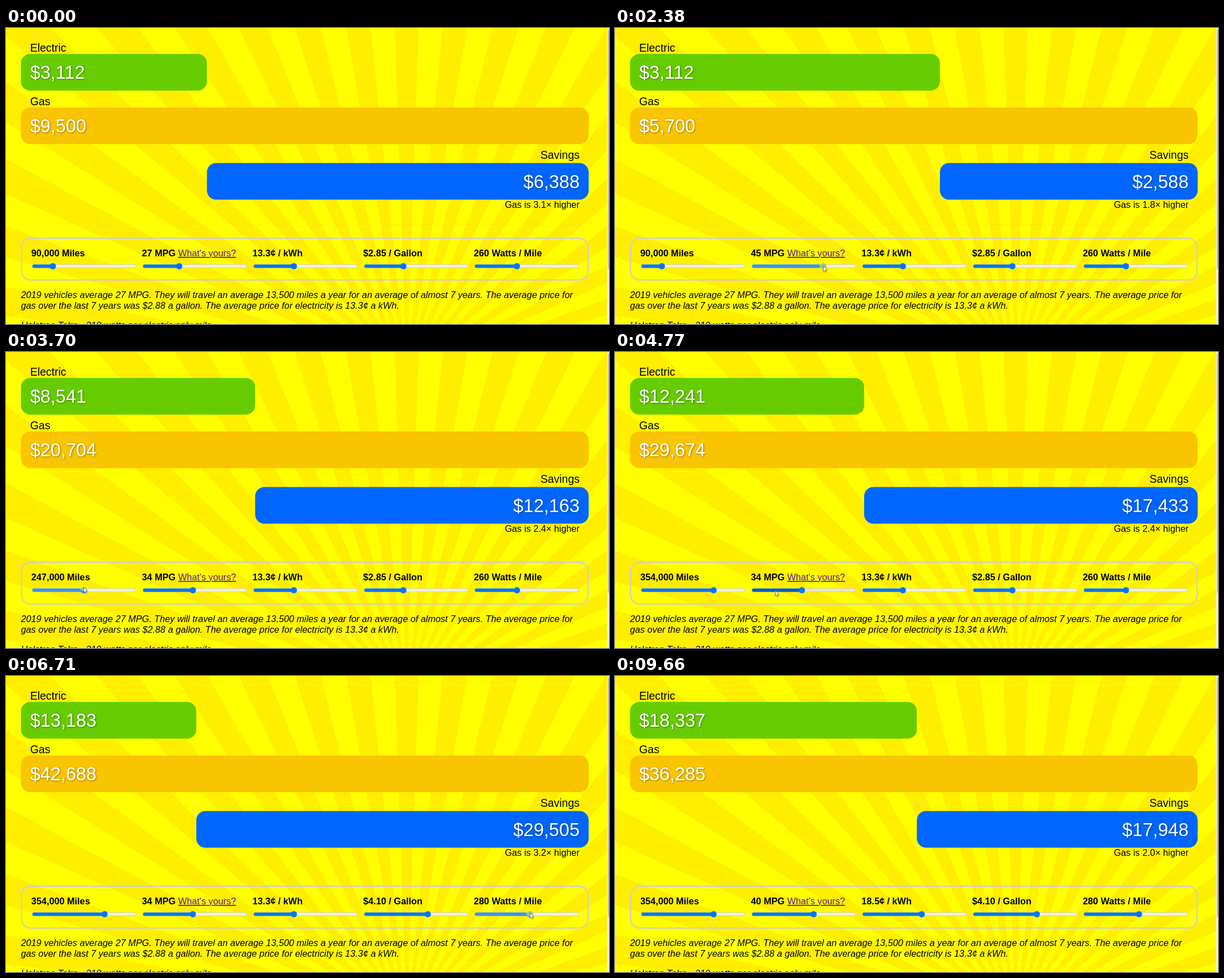
Recreate the animation shown at these times as an HTML page. Size 1067x525 px, loop 9980 ms.

```html
<!DOCTYPE html>
<html lang="en">
<head>
<meta charset="utf-8">
<title>Electric vs gas</title>
<style>
  html, body { margin: 0; width: 100%; height: 100%; overflow: hidden; }
  body { background: repeating-conic-gradient(from -2deg at 709px 610px, #fe0 0 4deg, #ff0 4deg 8deg); }
  svg { display: block; width: 1067px; height: 525px; }
  text { font: 16.25px "Liberation Sans", Arial, sans-serif; white-space: pre; }
  .name { font-size: 19.5px; }
  .cost { font-size: 32.5px; fill: #fff; filter: drop-shadow(1px 1px 1.5px rgba(0, 0, 0, .4)); }
  .end { text-anchor: end; }
  .label { font-weight: bold; }
  .link { font-weight: normal; fill: #551a8b; text-decoration: underline; }
  .note { font-style: italic; }
</style>
</head>
<body>
<svg viewBox="0 0 1067 525">
  <text class="name" x="42.7" y="42">Electric</text>
  <rect id="electricBar" x="26.5" y="46" height="65" rx="16.2" fill="#6c0"/>
  <text id="electric" class="cost" x="42.7" y="90"></text>

  <text class="name" x="42.7" y="136.7">Gas</text>
  <rect id="gasBar" x="26.5" y="141" height="65" rx="16.2" fill="#f9c400"/>
  <text id="gas" class="cost" x="42.7" y="185"></text>

  <text class="name end" x="1015" y="232">Savings</text>
  <rect id="savingsBar" y="239.5" height="65" rx="16.2" fill="#06f"/>
  <text id="savings" class="cost end" x="1015" y="283.5"></text>
  <text id="ratio" class="end" x="1015" y="319.3"></text>

  <rect x="27.5" y="373" width="1002.5" height="74" rx="16" fill="none" stroke="#ccc" stroke-width="2"/>
  <g id="sliders"></g>

  <g class="notes">
    <text class="note" x="26.5" y="479">2019 vehicles average 27 MPG. They will travel an average 13,500 miles a year for an average of almost 7 years. The average price for</text>
    <text class="note" x="26.5" y="497.7">gas over the last 7 years was $2.88 a gallon. The average price for electricity is 13.3¢ a kWh.</text>
    <text class="note" x="26.5" y="533">Halstran Telro - 310 watts per electric only mile</text>
  </g>

  <rect x="1064" width="3" height="525" fill="#f1f1f1"/>
  <rect x="1065" y="3" width="2" height="424" fill="#c1c1c1"/>

  <circle id="press" r="7" fill="#ff0" opacity=".5"/>
  <path id="cursor" d="M0 0V9.5L2.2 7.6L3.8 11L5.5 10.2L4 7H7Z" fill="#fff" stroke="#444" stroke-width=".8"/>
</svg>
<script>
const LOOP = 9980, LEFT = 26.5, WIDTH = 1004.5, TRACK = 183.5, TRAVEL = 173.2;
const $ = id => document.getElementById(id);
const money = n => '$' + n.toLocaleString('en-US');

const specs = {
  miles:  { min: 0, max: 500000, step: 500, start: 90000, text: v => v.toLocaleString('en-US') + ' Miles' },
  mpg:    { min: 10, max: 60, step: 1, start: 27, text: v => v + ' MPG ' },
  kwh:    { min: 3, max: 30, step: .1, start: 13.3, text: v => v.toFixed(1) + '¢ / kWh' },
  gallon: { min: 1, max: 6, step: .05, start: 2.85, text: v => '$' + v.toFixed(2) + ' / Gallon' },
  watts:  { min: 200, max: 350, step: 5, start: 260, text: v => v + ' Watts / Mile' }
};

// Each drag holds [time, value] keys; the button is down from first to last.
const drags = [
  { on: 'mpg', y: 422, keys: [[1100, 27], [1480, 32], [2120, 47], [2200, 47], [2380, 45], [2950, 34], [3050, 34]] },
  { on: 'miles', y: 417, keys: [[3690, 245500], [4450, 354000], [4600, 354000]] },
  { on: 'gallon', y: 421, keys: [[5640, 2.85], [6100, 4.1], [6180, 4.1]] },
  { on: 'watts', y: 420, keys: [[6460, 260], [6700, 280], [6810, 280]] },
  { on: 'kwh', y: 422, keys: [[7420, 13.3], [7940, 18.5], [8040, 18.5]] },
  { on: 'mpg', y: 422, keys: [[8660, 34], [8960, 40], [9060, 40]] }
];

function along(keys, t, i = 1) {
  if (t <= keys[0][0]) return keys[0][i];
  const n = keys.findIndex(k => k[0] > t);
  if (n < 0) return keys[keys.length - 1][i];
  const a = keys[n - 1], b = keys[n];
  return a[i] + (b[i] - a[i]) * (t - a[0]) / (b[0] - a[0]);
}

function add(tag, parent, attrs) {
  const el = document.createElementNS('http://www.w3.org/2000/svg', tag);
  for (const name in attrs) el.setAttribute(name, attrs[name]);
  return parent.appendChild(el);
}

const thumbX = (s, v) => s.x + 5.2 + TRAVEL * (v - s.min) / (s.max - s.min);

Object.entries(specs).forEach(([name, s], i) => {
  s.x = 46.6 + 195.75 * i;
  const g = $('sliders');
  const label = add('text', g, { class: 'label', x: s.x - 1.8, y: 405 });
  s.label = add('tspan', label, {});
  if (name === 'mpg') add('tspan', label, { class: 'link' }).textContent = "What's yours?";
  s.track = add('rect', g, { x: s.x, y: 419.7, width: TRACK, height: 5.6, rx: 2.8, stroke: '#c8c8b8', 'stroke-width': .8 });
  s.fill = add('rect', g, { x: s.x, y: 419.4, height: 6.2, rx: 3 });
  s.thumb = add('circle', g, { cy: 422.5, r: 5.5 });
});

const path = [
  [90, 972, 520], [450, 700, 462], [800, 345, 428], [970, 307, 422],
  [3350, 165, 408], [3550, 137, 417],
  [4770, 283, 423], [5100, 490, 432], [5510, 703, 421],
  [6990, 928, 420], [7200, 720, 431],
  [8430, 543, 422], [9410, 1015, 513], [9480, 1017, 515], [9650, 1019, 526]
];
for (const d of drags)
  for (const [t, v] of [d.keys[0], d.keys[d.keys.length - 1]])
    path.push([t, thumbX(specs[d.on], v), d.y]);
path.sort((a, b) => a[0] - b[0]);

function valueOf(name, t) {
  const s = specs[name];
  const drag = drags.filter(d => d.on === name && t >= d.keys[0][0]).pop();
  const v = drag ? along(drag.keys, t) : s.start;
  return +(Math.round(v / s.step) * s.step).toFixed(2);
}

function draw(t) {
  const held = drags.find(d => t >= d.keys[0][0] && t < d.keys[d.keys.length - 1][0]);
  const x = held ? thumbX(specs[held.on], along(held.keys, t)) : along(path, t, 1);
  const y = held ? held.y : along(path, t, 2);
  const now = {};

  for (const name in specs) {
    const s = specs[name], v = now[name] = valueOf(name, t), tx = thumbX(s, v);
    const active = held && held.on === name;
    const hover = !held && x >= s.x && x <= s.x + TRACK && y > 414 && y < 431;
    const onThumb = hover && Math.hypot(x - tx, y - 422.5) < 6;
    s.label.textContent = s.text(v);
    s.track.setAttribute('fill', hover ? '#e5e5e5' : '#efefef');
    s.fill.setAttribute('width', tx - s.x);
    s.fill.setAttribute('fill', active ? '#3793ff' : hover ? '#005cc8' : '#0075ff');
    s.thumb.setAttribute('cx', tx);
    s.thumb.setAttribute('fill', active ? '#3793ff' : onThumb ? '#005cc8' : '#0075ff');
  }

  const electric = Math.round(now.miles * now.watts * now.kwh / 1e5);
  const gas = Math.round(now.miles / now.mpg * now.gallon);
  const split = WIDTH * Math.min(1, electric / gas);
  $('electric').textContent = money(electric);
  $('gas').textContent = money(gas);
  $('savings').textContent = money(gas - electric);
  $('ratio').textContent = `Gas is ${(gas / electric).toFixed(1)}× higher`;
  $('electricBar').setAttribute('width', split);
  $('gasBar').setAttribute('width', WIDTH);
  $('savingsBar').setAttribute('x', LEFT + split);
  $('savingsBar').setAttribute('width', WIDTH - split);

  const place = `translate(${x} ${y})`;
  $('cursor').setAttribute('transform', place);
  $('press').setAttribute('transform', place);
  $('cursor').style.display = t >= 90 && t < 9650 ? '' : 'none';
  $('press').style.display = held ? '' : 'none';
}

const begin = performance.now();
function tick() {
  draw((performance.now() - begin) % LOOP);
  requestAnimationFrame(tick);
}
tick();
</script>
</body>
</html>
```
